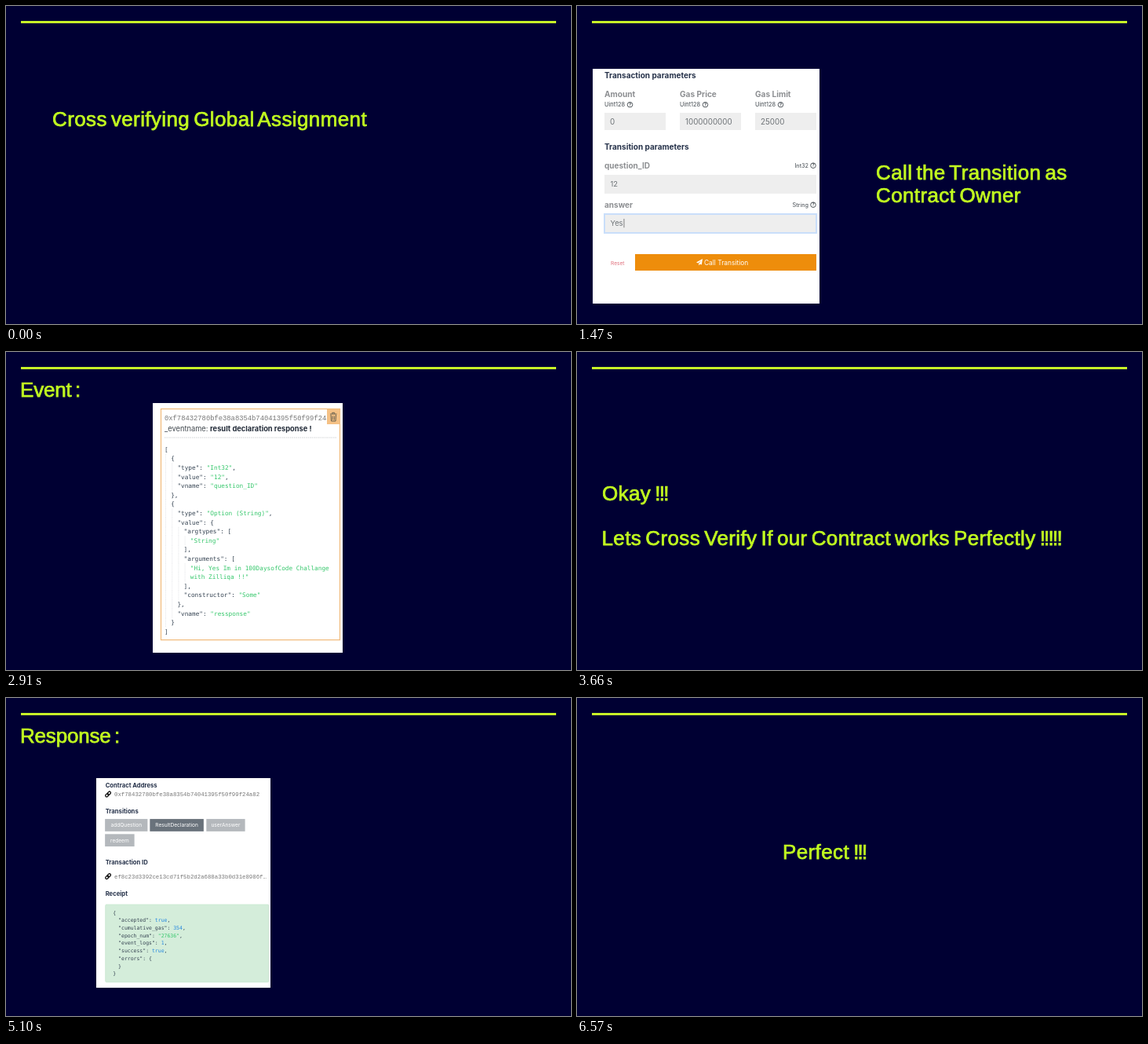
An HTML page that plays this animation: 720 by 405 pixels, repeating every 7290 ms.

```html
<!DOCTYPE html>
<html lang="en">
<head>
<meta charset="utf-8">
<title>Cross verifying Global Assignment</title>
<style>
html, body { margin: 0; width: 100%; height: 100%; overflow: hidden; background: #000033; }
svg { display: block; width: 100%; height: 100%; }
text { white-space: pre; font-family: Inter, sans-serif; }
.title { font: 26px "Liberation Sans", Arial, sans-serif; letter-spacing: .38px; word-spacing: -2.5px;
  fill: #c2fc20; stroke: #c2fc20; stroke-width: .75; }
.title.top { letter-spacing: -.2px; }
.title .bang { letter-spacing: -1.8px; }
.head { font-weight: 700; fill: #26324a; }
.label { font-weight: 700; fill: #8d8f92; }
.body { fill: #42494f; }
.value { fill: #6d7276; }
.hash { font-family: "Liberation Mono", monospace; fill: #777; }
.code { font-family: "DejaVu Sans Mono", monospace; fill: #354352; }
.code .str { fill: #35c76b; }
.code .lit { fill: #2589e0; }
.slide { opacity: 0; }
.slide:first-of-type { opacity: 1; }
</style>
</head>
<body>
<svg id="stage" viewBox="0 0 720 405" xmlns="http://www.w3.org/2000/svg"></svg>
<script>
const LOOP = 7290;
const CONTRACT = '0xf78432780bfe38a8354b74041395f50f99f24a82';

const rect = (x, y, w, h, fill, extra = '') =>
  `<rect x="${x}" y="${y}" width="${w}" height="${h}" fill="${fill}" ${extra}/>`;
const text = (cls, x, y, size, str, extra = '') =>
  `<text class="${cls}" x="${x}" y="${y}" font-size="${size}" ${extra}>${str}</text>`;
const path = (d, fill, stroke = 'none', width = 1, extra = '') =>
  `<path d="${d}" fill="${fill}" stroke="${stroke}" stroke-width="${width}" ${extra}/>`;
const title = (x, y, str, cls = '') =>
  `<text class="title ${cls}" x="${x}" y="${y}">${str.replace(/!+/, '<tspan class="bang">$&</tspan>')}</text>`;
const topTitle = str => title(18, 56.6, str, 'top');
const place = (x, y, scale, inner) =>
  `<g transform="translate(${x} ${y}) scale(${scale})">${inner}</g>`;

const help = (x, y) =>
  `<circle cx="${x}" cy="${y}" r="3.3" fill="none" stroke="#42494f" stroke-width=".9"/>` +
  text('body', x, y + 2, 5.6, '?', 'text-anchor="middle" font-weight="700"');

const link = (x, y) => `<g transform="translate(${x} ${y}) rotate(-45)" fill="none" stroke="#111" stroke-width="1.3">
  <rect x="-4.2" y="-1.6" width="4.8" height="3.2" rx="1.6"/>
  <rect x="-.6" y="-1.6" width="4.8" height="3.2" rx="1.6"/></g>`;

function highlight(line) {
  return line.replace(/"[^"]*"?(:?)|\b(true|\d+)\b|[^"]+"(?=$|,)/g, (token, colon, literal) => {
    if (colon) return token;
    return `<tspan class="${literal ? 'lit' : 'str'}">${token}</tspan>`;
  });
}

// One leading space in a line is one indent level.
function json(x, y, size, pitch, indent, lines) {
  return lines.map((line, i) => {
    const depth = line.search(/\S/);
    return text('code', x + depth * indent, y + i * pitch, size, highlight(line.trim()));
  }).join('');
}

function form(heading, params, button) {
  const columns = [['Amount', '0'], ['Gas Price', '1000000000'], ['Gas Limit', '25000']];
  let out = text('head', 56, 84.3, 10, 'Transaction parameters');
  columns.forEach(([name, value], i) => {
    const x = 56 + i * 96;
    out += text('label', x, 108.3, 10.1, name) + text('body', x, 120.3, 7.4, 'Uint128') + help(x + 32.5, 117.7) +
      rect(x, 128, 78, 22, '#eeeeee') + text('value', x + 7, 142.6, 9.8, value);
  });
  out += text('head', 56, 174.6, 10, heading);
  params.forEach(([name, type, value], i) => {
    const y = 199 + i * 50;
    const active = i === params.length - 1;
    out += text('label', 56, y, 10, name) +
      text('body', 316, y - .8, 7.3, type, 'text-anchor="end"') + help(322, y - 3.8) +
      rect(56, y + 8, 270, 24, '#eeeeee', active ? 'stroke="#c9defa" stroke-width="2"' : '') +
      text('value', 63.5, y + 23.2, 9.4, value + (active ? '<tspan fill="#222" font-weight="300">|</tspan>' : ''));
  });
  const y = 208 + params.length * 50;
  return out + text('', 64, y + 13.6, 6.6, 'Reset', 'fill="#e0707c"') +
    rect(95, y, 231, 21, '#ee8d0b') +
    path(`M181 ${y + 6}l-8 4.6 2.3 1 4.3-3.7-3.4 4.2v2.4l1.4-1.8 2.2.9z`, '#fff') +
    text('', 183, y + 13.8, 8.4, button, 'fill="#fff"');
}

function response(txId, gas, epoch) {
  const buttons = [[125, 144.5, 55, 'addQuestion'], [183, 144.5, 69.5, 'ResultDeclaration'],
    [256, 144.5, 50, 'userAnswer'], [125, 164, 38, 'redeem']];
  return text('head', 125.5, 103.6, 7.8, 'Contract Address') + link(129, 112.5) +
    text('hash', 137, 115, 7.46, CONTRACT) +
    text('head', 125.5, 137.2, 7.8, 'Transitions') +
    buttons.map(([x, y, w, name], i) => rect(x, y, w, 16, i === 1 ? '#69727b' : '#b4b8bc') +
      text('', x + w / 2, y + 10.4, 6.7, name, 'fill="#fff" text-anchor="middle"')).join('') +
    text('head', 125.5, 203, 7.8, 'Transaction ID') + link(129, 218.6) +
    text('hash', 137, 221.2, 7.46, txId + '…') +
    text('head', 125.5, 244, 7.8, 'Receipt') +
    rect(125.5, 255, 211, 100.3, '#d4edda', 'rx="1.5" stroke="#c6e6ce" stroke-width=".7"') +
    json(135.3, 267.7, 6.58, 9.85, 6.9, ['{', ' "accepted": true,', ` "cumulative_gas": ${gas},`,
      ` "epoch_num": "${epoch}",`, ' "event_logs": 1,', ' "success": true,', ' "errors": {', ' }', '}']);
}

function guides(lines, pitch) {
  let out = '';
  lines.forEach((line, i) => {
    for (let level = 0; level < line.search(/\S/); level++) {
      const x = 203.5 + level * 8.2;
      const y = 118.5 + i * pitch;
      out += path(`M${x} ${y}v${pitch}`, 'none', '#d2d5d8', .6, 'stroke-dasharray="1 1"');
    }
  });
  return out;
}

function eventLog(name, lines) {
  const pitch = 11.6;
  const bottom = 134.7 + (lines.length - 1) * pitch;
  return rect(197.5, 72.5, 228, bottom - 72.5, 'none', 'stroke="#f0b978" stroke-width="1.2"') +
    text('hash', 202, 87, 8.82, CONTRACT) +
    rect(409, 73, 16.5, 19, '#f5c185') +
    path('M413 79h8.5M415.7 78.6v-1.3h3v1.3M414 80l.5 8h5.5l.5-8M416.1 81.5v5M418.3 81.5v5', 'none', '#68604f', 1) +
    text('body', 202, 100.6, 9.3, `_eventname: <tspan font-weight="700" fill="#222b38">${name}</tspan>`) +
    path('M202 109H422', 'none', '#c4c7ca', .8, 'stroke-dasharray="1.5 1"') +
    guides(lines, pitch) + json(202, 126.7, 7.74, pitch, 8.2, lines);
}

const question = ['[', ' {', '  "type": "Int32",', '  "value": "12",', '  "vname": "question_ID"', ' },',
  ' {', '  "type": "Option (String)",', '  "value": {', '   "argtypes": [', '    "String"', '   ],'];
const ending = ['  },', '  "vname": "ressponse"', ' }', ']'];
const answered = [...question, '   "arguments": [', '    "Hi, Yes Im in 100DaysofCode Challange',
  '    with Zilliqa !!"', '   ],', '   "constructor": "Some"', ...ending];
const unanswered = [...question, '   "arguments": [],', '   "constructor": "None"', ...ending];

const declaration = [['question_ID', 'Int32', '12'], ['answer', 'String', 'Yes']];
const callForm = form('Transition parameters', declaration, 'Call Transition');

const slides = [
  [0, title(59, 153, 'Cross verifying Global Assignment')],
  [750, rect(41, 72, 289, 285, '#fff') + path('M328.5 72V357', 'none', '#e6e6ea') +
    form('Initialization parameters',
      [['oracle', 'ByStr20', '0xE6c6232e3B2Fa3365642fa2B13511c048A66e3B4']], 'Deploy Contract') +
    title(381, 221, 'Note the Contract Owner') + title(381.5, 250, 'Address')],
  [1470, rect(20, 80, 289, 299, '#fff') + place(-21, 8, 1, callForm) +
    title(381, 221, 'Call the Transition as') + title(381, 250, 'Contract Owner')],
  [2190, topTitle('Response') + rect(114, 87, 226, 286, '#fff') +
    response('55dd5d2e97d4921a59fa3e80b397bd0fc6b769c904d', 378, 27592)],
  [2910, topTitle('Event :') + rect(187, 65, 242, 318, '#fff') +
    eventLog('result declaration response !', answered)],
  [3660, title(32, 188.5, 'Okay !!!') +
    title(31.5, 246.3, 'Lets Cross Verify If our Contract works Perfectly !!!!!')],
  [4380, topTitle('Calling Result Declaration with another User') + rect(115, 85, 208, 210, '#fff') +
    place(85.5, 33.2, .72, callForm)],
  [5100, topTitle('Response :') + rect(115, 102, 222, 267, '#fff') +
    place(2.9, 11.6, .986, response('ef8c23d3392ce13cd71f5b2d2a688a33b0d31e8986f', 354, 27636))],
  [5850, topTitle('Event :') + rect(112, 66, 230, 269, '#fff') +
    place(-65.6, 4.3, .95, eventLog('not a contract owner !', unanswered))],
  [6570, title(262, 204.5, 'Perfect !!!')],
];

const stage = document.getElementById('stage');
stage.innerHTML = rect(0, 0, 720, 405, '#000033') + rect(19, 19, 682, 3, '#c8f628') +
  slides.map(([, content]) => `<g class="slide">${content}</g>`).join('');

document.querySelectorAll('.slide').forEach((slide, i) => {
  const start = slides[i][0] / LOOP;
  const end = i + 1 < slides.length ? slides[i + 1][0] / LOOP : 1;
  const steps = [[start, 1], [end, 0]];
  if (start > 0) steps.unshift([0, 0]);
  if (end < 1) steps.push([1, 0]);
  slide.animate(steps.map(([offset, opacity]) => ({ offset, opacity, easing: 'steps(1, end)' })),
    { duration: LOOP, iterations: Infinity });
});
</script>
</body>
</html>
```
